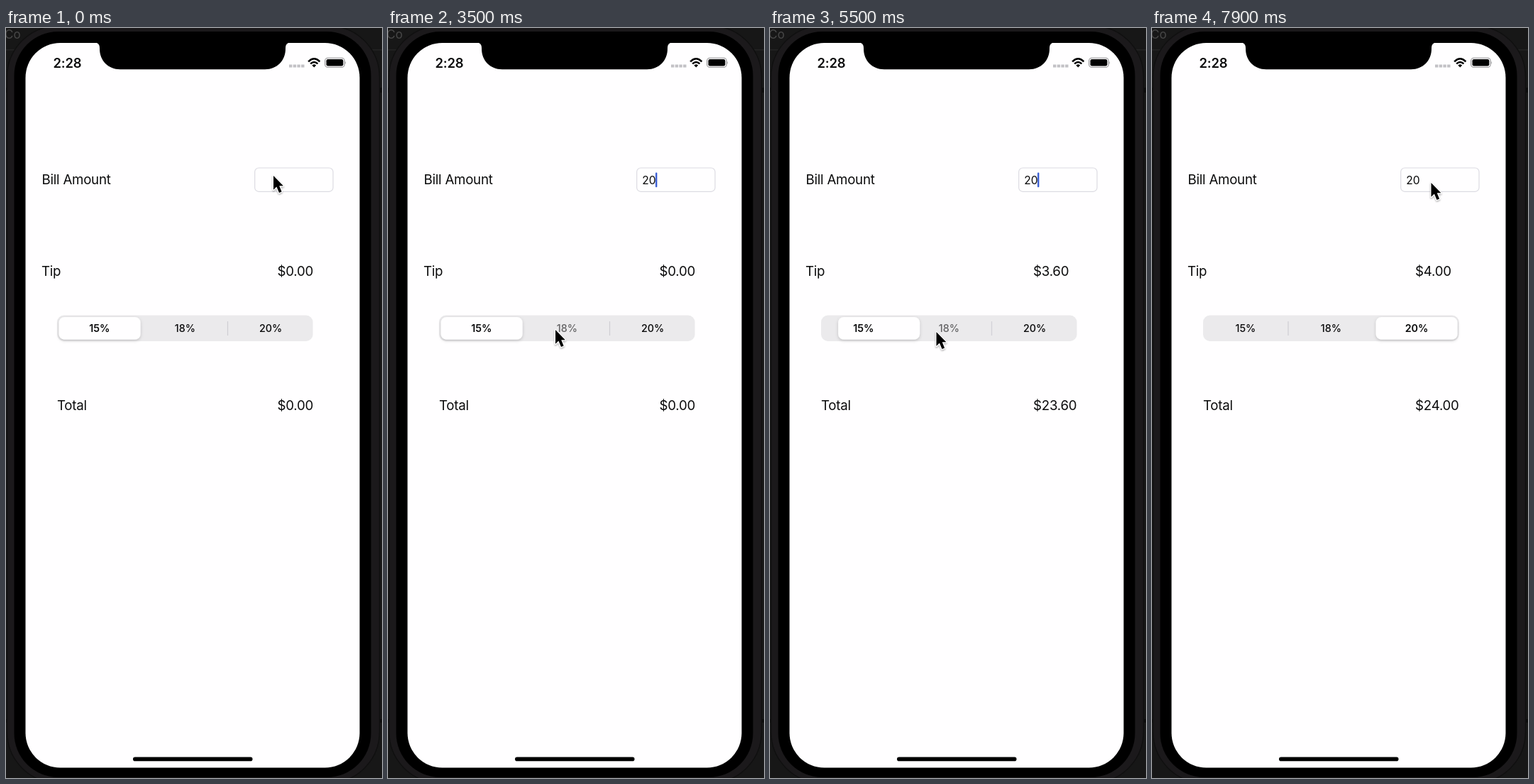
Write an HTML page that moves like this. It is 530x1056 px and loops after 8000 ms.

```html
<!DOCTYPE html>
<html lang="en">
<head>
<meta charset="utf-8">
<title>Tip calculator</title>
<style>
html, body { margin: 0; width: 100%; height: 100%; overflow: hidden; background: #151515; }
svg { display: block; width: 530px; height: 1056px; }
text { font-family: Inter, "Open Sans", sans-serif; fill: #0b0b0c; }
.label { font-size: 18.7px; letter-spacing: -0.25px; }
.seg { font-size: 14.3px; text-anchor: middle; }
</style>
</head>
<body>
<svg viewBox="0 0 530 1056">
  <defs>
    <filter id="soft" x="-20%" y="-30%" width="140%" height="180%">
      <feDropShadow dx="0" dy="1.7" stdDeviation="1.9" flood-color="#000" flood-opacity="0.19"/>
    </filter>
    <filter id="drop" x="-40%" y="-30%" width="190%" height="180%">
      <feDropShadow dx="0" dy="1.4" stdDeviation="1.3" flood-color="#000" flood-opacity="0.36"/>
    </filter>
  </defs>

  <!-- desktop behind the phone -->
  <rect width="530" height="1056" fill="#171717"/>
  <rect y="30" width="530" height="1.5" fill="#242424"/>
  <text x="-2" y="15" font-size="17" style="fill:#484848">Co</text>
  <path d="M0 84H530V91H0ZM0 973H530V978H0Z" fill="#0c0c0c"/>

  <!-- phone -->
  <rect x="1.5" y="-3" width="525" height="1066" rx="72" fill="#1b191b" stroke="#101010" stroke-width="1.5"/>
  <rect x="11.5" y="5" width="503" height="1050" rx="62"/>
  <rect x="27.5" y="21" width="471" height="1020.5" rx="49" fill="#fffeff"/>
  <path d="M125 20H401Q394 21 394 28V29C394 46 382 58.2 365 58.2H161C144 58.2 132 46 132 29V28Q132 21 125 20Z"/>
  <rect x="179" y="1026.6" width="168.5" height="5.6" rx="2.8"/>

  <!-- status bar -->
  <text x="66.5" y="55.6" font-size="18.4" font-weight="600" letter-spacing="-0.2">2:28</text>
  <path d="M399 53.5H421" stroke="#c2c1c5" stroke-width="4" stroke-dasharray="4.4 1.3"/>
  <g fill="none" stroke="#000" stroke-width="2.5">
    <path d="M426.2 47.3Q434.3 39.3 442.4 47.3"/>
    <path d="M429.2 50.4Q434.3 45.6 439.4 50.4"/>
  </g>
  <path d="M431.4 52.4Q434.3 49.9 437.2 52.4L434.3 55.4Z"/>
  <rect x="449.7" y="42.3" width="27.4" height="13" rx="3.8" fill="none" stroke="#8e8d90" stroke-width="1.1"/>
  <rect x="451.5" y="44" width="23.8" height="9.6" rx="2.3"/>
  <path d="M478.4 46.7Q480 48.8 478.4 50.9Z" fill="#8e8d90"/>

  <!-- form -->
  <text class="label" x="50.6" y="220">Bill Amount</text>
  <text class="label" x="50" y="348.7">Tip</text>
  <text class="label" x="72" y="538">Total</text>
  <text class="label" id="tip" y="348.9"></text>
  <text class="label" id="total" y="538"></text>
  <rect x="350.7" y="197" width="110.3" height="33.3" rx="5.5" fill="#fffeff" stroke="#dcdbe2" stroke-width="1.2"/>
  <text id="bill" x="358.3" y="219.6" font-size="15.6"></text>
  <rect id="caret" y="203.5" width="2.4" height="20.7" rx="1" fill="#3c60d4"/>

  <rect x="72" y="404.6" width="360.6" height="36.3" rx="9.5" fill="#ebeaec"/>
  <rect id="div0" x="191.4" y="413" width="1.2" height="20" fill="#cfced3"/>
  <rect id="div1" x="311.9" y="413" width="1.2" height="20" fill="#cfced3"/>
  <rect id="thumb" y="407" width="115" height="31.6" rx="7.8" fill="#fffeff" filter="url(#soft)"/>
  <text class="seg" id="seg0" x="131.9" y="428.3">15%</text>
  <text class="seg" id="seg1" x="252.4" y="428.3">18%</text>
  <text class="seg" id="seg2" x="373" y="428.3">20%</text>

  <!-- edit menu -->
  <g id="menu">
    <rect x="319.8" y="141.4" width="79.8" height="41" rx="8.5"/>
    <path d="M346.5 182H372.5Q370 182.6 368 184.6L361.4 191.8Q359.6 193.6 357.8 191.8L351 184.6Q349 182.6 346.5 182Z"/>
    <text x="359.7" y="167.8" font-size="15.2" text-anchor="middle" style="fill:#e6e5e7">Paste</text>
  </g>

  <path id="cursor" d="M0 0V19.8L4.4 15.6L8 24L11.6 22.5L8.2 14.3H13.9Z"
    stroke="#fff" stroke-width="2.4" stroke-linejoin="round" paint-order="stroke" filter="url(#drop)"/>
</svg>

<script>
const LOOP = 8000, STEP = 100, BILL = 20;
const rates = [0.15, 0.18, 0.2];
const el = id => document.getElementById(id);
const clamp = v => Math.max(0, Math.min(1, v));
const ramp = (t, from, span) => clamp((t - from) / span);
const ease = p => p * p * (3 - 2 * p);
const set = (id, attrs) => {
  for (const k in attrs) el(id).setAttribute(k, attrs[k]);
};

// pointer trips: when, how long, where to, optional bend
const home = [377, 208];
const trips = [
  { at: 200, span: 100, to: [375.5, 207] },
  { at: 2500, span: 700, to: [236, 425], bend: [470, 395] },
  { at: 3700, span: 300, to: [257, 425] },
  { at: 4300, span: 400, to: [131, 425] },
  { at: 4900, span: 300, to: [234.5, 428] },
  { at: 5700, span: 400, to: [361.5, 423] },
  { at: 6500, span: 800, to: [393.5, 218] }
];
const taps = [
  { at: 3555, seg: 1 }, { at: 4755, seg: 0 }, { at: 5455, seg: 1 }, { at: 6143, seg: 2 }
];

function pointer(t) {
  let pos = home;
  for (const { at, span, to, bend } of trips) {
    const p = ease(ramp(t, at, span)), q = 1 - p;
    pos = pos.map((a, i) => {
      const mid = bend ? bend[i] : (a + to[i]) / 2;
      return q * q * a + 2 * p * q * mid + p * p * to[i];
    });
  }
  return pos;
}

// solid while focusing or typing, otherwise blinking once a second
function caretAlpha(t) {
  if (t < 300) return 0;
  if (t < 900 || (t >= 2100 && t < 2600)) return 1;
  const phase = (t < 2100 ? t + 200 : t) % 1000 / 1000;
  return clamp(8 * Math.min(phase - 0.06, 0.84 - phase));
}

const spring = ms => {
  const x = ms * 0.017;
  return 1 - (1 + x) * Math.exp(-x);
};

function segments(t) {
  const s = { pos: 0, value: null, bold: 0, held: -1 };
  let last = 0;
  for (const { at, seg } of taps) {
    const age = t - at;
    if (Math.abs(age) < 100) s.held = seg;
    if (age >= 0) {
      s.value = seg;
      s.pos = last + (seg - last) * spring(age);
      if (age >= 100) s.bold = seg;
    }
    last = seg;
  }
  return s;
}

function money(id, amount, x) {
  el(id).textContent = "$" + amount.toFixed(2);
  set(id, { x });
}

function draw(t) {
  const typed = String(BILL).slice(0, Math.floor(2 * ramp(t, 2000, 400)));
  el("bill").textContent = typed;
  set("caret", { x: 358.8 + typed.length * 9.1, opacity: caretAlpha(t) });

  const s = segments(t);
  const tip = s.value === null ? 0 : BILL * rates[s.value];
  const left = tip ? 371.1 : 382.5;
  money("tip", tip, left);
  money("total", tip && BILL + tip, left);

  set("thumb", { x: 74.6 + s.pos * 120.5 });
  set("div0", { opacity: clamp(s.pos - 1) });
  set("div1", { opacity: clamp(1 - s.pos) });
  rates.forEach((_, i) => set("seg" + i, {
    "font-weight": i === s.bold ? 600 : 500,
    opacity: i === s.held ? 0.6 : 1
  }));

  set("menu", { opacity: ramp(t, 1100, 200) - ramp(t, 2000, 200) });
  set("cursor", { transform: `translate(${pointer(t)})` });
}

const start = performance.now();
function tick() {
  const t = (performance.now() - start) % LOOP;
  draw(Math.floor(t / STEP) * STEP);
  requestAnimationFrame(tick);
}
tick();
</script>
</body>
</html>
```
